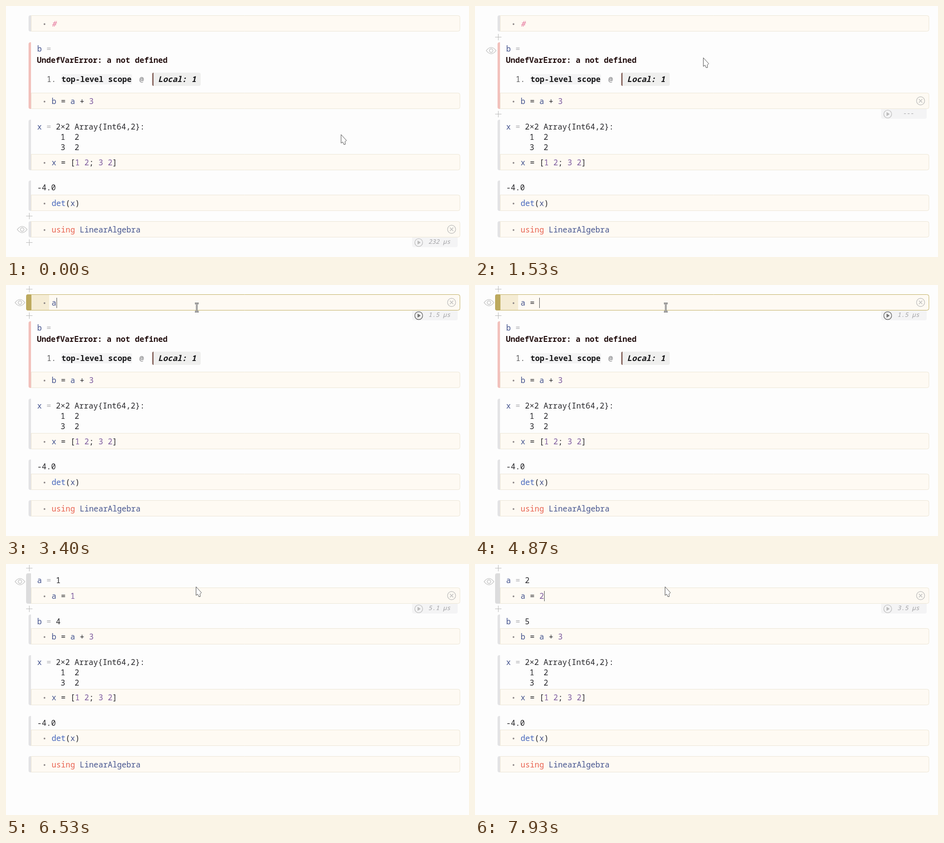
Animation of 944x512 px, one loop 8 s. Source, as an HTML page with a canvas:

```html
<!DOCTYPE html>
<html lang="en">
<head>
<meta charset="utf-8">
<title>Reactive notebook</title>
<style>
  html, body { margin: 0; width: 100%; height: 100%; overflow: hidden; background: #fdfdfd; }
  canvas { display: block; width: 944px; height: 512px; }
</style>
</head>
<body>
<canvas id="stage" width="944" height="512"></canvas>
<script>
const ctx = document.getElementById('stage').getContext('2d');
const LOOP = 8000, CHAR = 9.54, LINE = 21, FADE = 200;
const MONO = '"Noto Sans Mono", "DejaVu Sans Mono", monospace';
const INK = {
  page: '#fdfdfd', input: '#fefaf3', edge: '#ede7d8', shoulder: '#e3e3e5', error: '#f2c1bc',
  focus: '#dcdcdd', dirty: '#bca95e', dirtyEdge: '#c6b56c', gutter: '#f5ecd4', stampBox: '#f4f4f5',
  dark: '#26262a', faint: '#b0b0b4', variable: '#46558f', number: '#7d5a9e', keyword: '#e8614f',
  call: '#4868bd', comment: '#e5779d', icon: '#bcbcbc', bullet: '#8d8687', stamp: '#a2a2a5'
};

// Editing script: [time, code of the first cell]
const EDITS = [[0, '#'], [2400, '#'], [3200, ''], [3400, 'a'], [3530, 'a '], [3670, 'a ='],
  [3800, 'a = '], [5670, 'a = 1'], [6730, 'a = '], [6930, 'a = 2'], [7130, 'a = 2\n'], [7470, 'a = 2']];
const FOCUS = 2400, FIRST_RUN = 6200, SECOND_RUN = 7730;
const UNSAVED = [[3200, 6070], [6730, 7600]];
const HOVER = [[-999, 70, 4], [70, 390, 2], [390, 1640, 1], [1640, 9999, 0]];

const clamp = v => Math.max(0, Math.min(1, v));
const fade = (t, from, to) => Math.min(clamp((t - from) / FADE), 1 - clamp((t - to) / FADE));
const easeOut = p => 1 - (1 - p) ** 3;
const easeInOut = p => p * p * (3 - 2 * p);

function withAlpha(alpha, draw) {
  if (alpha <= 0) return;
  ctx.save();
  ctx.globalAlpha *= alpha;
  draw();
  ctx.restore();
}

function box(x, y, w, h, fill, radius = 0) {
  ctx.beginPath();
  ctx.roundRect(x, y, w, h, radius);
  ctx.fillStyle = fill;
  ctx.fill();
}

function outline(x, y, w, h, color) {
  ctx.beginPath();
  ctx.roundRect(x + .5, y + .5, w - 1, h - 1, [0, 4, 4, 0]);
  ctx.strokeStyle = color;
  ctx.lineWidth = 1;
  ctx.stroke();
}

function text(str, x, y, color, style = '', size = 15.9) {
  ctx.font = `${style} ${size}px ${MONO}`;
  ctx.fillStyle = color;
  ctx.fillText(str, x, y);
}

function code(str, x, y) {
  for (const m of str.matchAll(/#|\w+(?=\()|\w+|[^\w#]+/g)) {
    const word = m[0];
    let color = INK.dark, style = '';
    if (word === 'using') color = INK.keyword;
    else if (word === '#') { color = INK.comment; style = 'italic'; }
    else if (/^\d/.test(word)) color = INK.number;
    else if (str[m.index + word.length] === '(') color = INK.call;
    else if (/^\w/.test(word)) { color = INK.variable; style = '500'; }
    text(word, x + m.index * CHAR, y, color, style);
  }
}

function assigned(name, value, y) {
  text(name, 63.5, y, INK.variable, '500');
  text('=', 63.5 + 2 * CHAR, y, INK.faint);
  text(value, 63.5 + 4 * CHAR, y, INK.dark);
}

function errorOutput(y) {
  assigned('b', '', y + 19);
  text('UndefVarError: a not defined', 63, y + 42, '#200c0c', 'bold', 15.85);
  text('1.', 83, y + 81, '#5c5c5e');
  box(113, y + 65, 144, 21, '#f3f3f4', 3);
  text('top-level scope', 113, y + 81, '#161618', 'bold');
  text('@', 272, y + 81, '#77777a', '', 15);
  box(298, y + 62, 99, 27, '#efefee', 4);
  box(298, y + 62, 3, 27, '#8f6f68', [4, 0, 0, 4]);
  text('Local: 1', 310, y + 81, '#161618', 'italic bold', 16.2);
}

function matrixOutput(y) {
  assigned('x', '2×2 Array{Int64,2}:', y + 20);
  text('     1  2', 63.5, y + 20 + LINE, INK.dark);
  text('     3  2', 63.5, y + 20 + 2 * LINE, INK.dark);
}

function strokePath(d, x, y, color, width = 1, fill) {
  ctx.save();
  ctx.translate(x, y);
  const path = new Path2D(d);
  if (fill) { ctx.fillStyle = fill; ctx.fill(path); }
  ctx.strokeStyle = color;
  ctx.lineWidth = width;
  ctx.stroke(path);
  ctx.restore();
}

function ring(x, y, r, color, width = 1.2) {
  ctx.beginPath();
  ctx.arc(x, y, r, 0, 7);
  ctx.strokeStyle = color;
  ctx.lineWidth = width;
  ctx.stroke();
}

const plus = y => strokePath('M-6.5 0H6.5M0-6.5V6.5', 47.5, Math.floor(y) + .5, INK.icon);

function playIcon(y, color, width) {
  ring(841.5, y, 8, color, width);
  strokePath('M-2 -3.5L3.5 0L-2 3.5Z', 841.5, y, color, .8, color);
}

function controls(cell, focused, dirty) {
  const eyeX = focused ? 28.5 : 33, eyeY = cell.top + 17;
  plus(cell.top - 11);
  plus(cell.end + 10.5);
  strokePath('M-10 0Q-5-6.5 0-6.5T10 0Q5 6.5 0 6.5T-10 0Z', eyeX, eyeY, INK.icon, 1.2);
  ring(eyeX, eyeY, 3.6, INK.icon);
  ring(908.5, cell.input + 16.5, 8.3, INK.icon);
  strokePath('M-3.5-3.5L3.5 3.5M3.5-3.5L-3.5 3.5', 908.5, cell.input + 16.5, INK.icon, 1.2);
  box(828, cell.end, 93, 20, INK.stampBox, [0, 0, 4, 4]);
  playIcon(cell.end + 10.5, INK.icon, 1.2);
  withAlpha(dirty, () => playIcon(cell.end + 10.5, '#757575', 1.4));
  const dashes = cell.stamp === '---';
  text(cell.stamp, dashes ? 872 : 861, cell.end + 13, INK.stamp, 'italic', 12.5);
}

function drawCell(cell, focused, dirty) {
  const { top, end, input } = cell, h = end - input, left = focused ? 41 : 46;
  const tone = cell.broken ? INK.error : focused ? INK.focus : INK.shoulder;
  box(left, top, 51 - left, end - top, tone, [4, 0, 0, 4]);
  box(51, input, 875, h, INK.input, [0, 4, 4, 0]);
  outline(51, input, 875, h, INK.edge);
  withAlpha(dirty, () => {
    box(left, top, 51 - left, end - top, INK.dirty, [4, 0, 0, 4]);
    box(51, input + 1, 37, h - 2, INK.gutter);
    outline(51, input, 875, h, INK.dirtyEdge);
  });
  if (cell.output) cell.output(top);
  cell.code.split('\n').forEach((line, i) => {
    const y = input + 23 + i * LINE;
    ctx.beginPath();
    ctx.arc(78.5, y - 5, 1.8, 0, 7);
    ctx.fillStyle = INK.bullet;
    ctx.fill();
    code(line, 93, y);
  });
}

function pointer(t) {
  const a = easeOut(clamp(t / 870)), b = easeInOut(clamp((t - 1070) / 800));
  return [685 - 94 * a - 202 * b, 262 - 63 * a - 153 * b];
}

function drawPointer(x, y, overCode) {
  if (overCode) {
    const beam = 'M-4-8.5H-1.5L0-7.5 1.5-8.5H4M0-7.5V7.5M-4 8.5H-1.5L0 7.5 1.5 8.5H4';
    strokePath(beam, x, y, '#555', 3);
    strokePath(beam, x, y, '#fff', 1);
  } else {
    strokePath('M0 .5V18L3.5 15.5 5.5 20.5H8.5L8 15 11 12.5Z', x - 1.5, y, '#555', 1, '#fff');
  }
}

function notebook(t, source) {
  const ran = t >= FIRST_RUN, a = t >= SECOND_RUN ? 2 : 1;
  const grow = source.endsWith('\n') ? LINE : 0;
  const tops = ran ? [103, 186, 310, 392] : [74, 232, 356, 439];
  const ends = ran ? [164, 288, 371, 425] : [210, 335, 418, 472];
  const below = (i, src, stamp, output, broken) => ({
    top: tops[i] + grow, end: ends[i] + grow, input: ends[i] + grow - 33,
    code: src, stamp, output, broken
  });
  return [
    {
      top: 19, input: ran ? 48 : 19, end: (ran ? 81 : 52) + grow, code: source,
      stamp: ran ? (a === 2 ? '3.5 µs' : '5.1 µs') : '1.5 µs',
      output: ran && (y => assigned('a', a, y + 20))
    },
    below(0, 'b = a + 3', '---', ran ? y => assigned('b', a + 3, y + 20) : errorOutput, !ran),
    below(1, 'x = [1 2; 3 2]', '4.1 µs', matrixOutput),
    below(2, 'det(x)', '2.8 µs', y => text('-4.0', 63.5, y + 20, INK.dark)),
    below(3, 'using LinearAlgebra', '232 µs')
  ];
}

function render(t) {
  const [edited, source] = EDITS.findLast(step => step[0] <= t);
  const cells = notebook(t, source);
  const focused = t >= FOCUS;
  const dirty = Math.max(...UNSAVED.map(([from, to]) => fade(t, from, to)));
  box(0, 0, 944, 512, INK.page);
  cells.forEach((cell, i) => drawCell(cell, !i && focused, i ? 0 : dirty));
  for (const [from, to, i] of HOVER)
    withAlpha(fade(t, from, to), () => controls(cells[i], !i && focused, i ? 0 : dirty));

  if (focused && (t - edited) % 1060 < 530) {
    const lines = source.split('\n');
    const x = 93 + Math.round(lines.at(-1).length * CHAR);
    box(x, cells[0].input + 7 + (lines.length - 1) * LINE, 1, 21, '#555');
  }
  const [x, y] = pointer(t);
  drawPointer(x, y, cells.some(c => y >= c.input && y < c.end));
}

const start = performance.now();
function tick() {
  render((performance.now() - start) % LOOP);
  requestAnimationFrame(tick);
}
tick();
</script>
</body>
</html>
```
